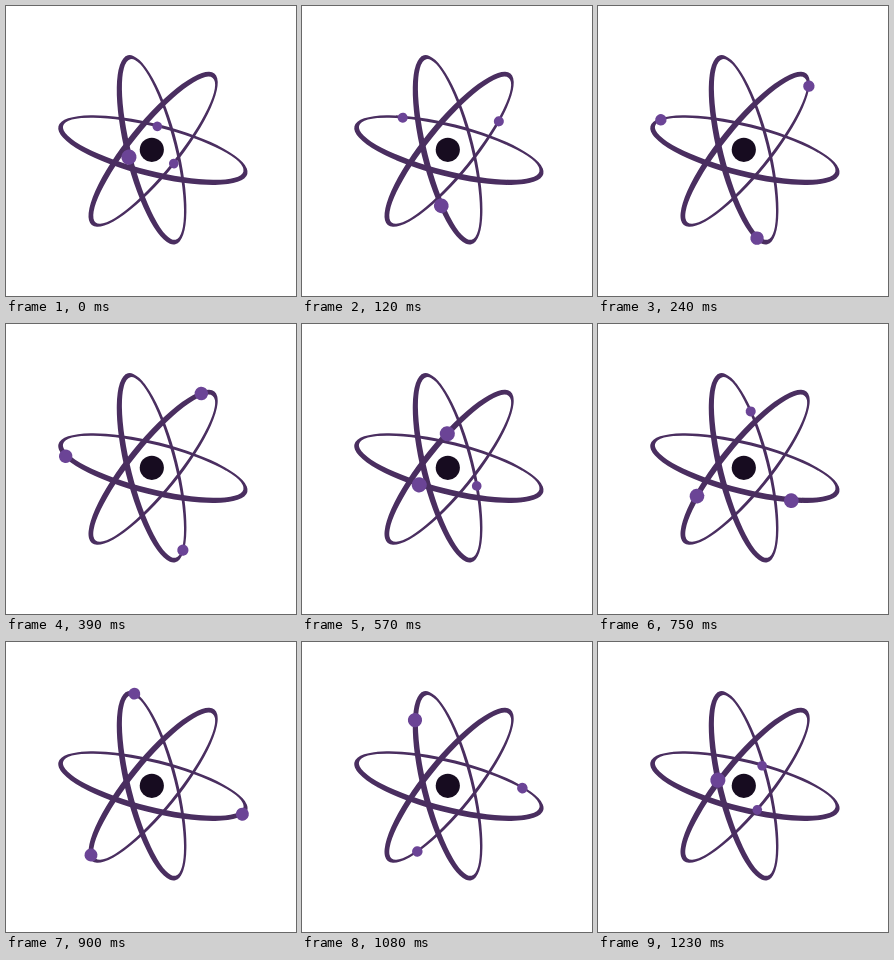
Write an HTML page that moves like this. It is 290x290 px and loops after 1.26 s.

```html
<!DOCTYPE html>
<html lang="en">
<head>
<meta charset="utf-8">
<title>Atom</title>
<style>
  html, body { margin: 0; width: 100%; height: 100%; overflow: hidden; background: #fff; }
  svg { display: block; width: 100vw; height: 100vh; }
  .ring { fill: #4a2e60; fill-rule: evenodd; }
  .electron { fill: #6b4496; }
  .nucleus { fill: #170c20; }
</style>
</head>
<body>
<svg viewBox="0 0 290 290">
  <g id="rings"></g>
  <circle class="nucleus" cx="145.8" cy="143.8" r="12.1"/>
  <g id="electrons"></g>
</svg>
<script>
  const LOOP = 1260, STEP = 30, TURN = 2 * Math.PI;

  // Local +y of each orbit points towards the viewer; phase is in turns.
  const orbits = [
    { ring: [146.9, 144.1], path: [147, 144.2], tilt: 14.15, phase: 0.003 },
    { ring: [145.6, 143.8], path: [146, 143.6], tilt: 75.9, phase: 0.503 },
    { ring: [147.1, 143.3], path: [147.9, 143.7], tilt: 129, phase: 0.003 }
  ];

  function add(parent, tag, attrs) {
    const el = document.createElementNS('http://www.w3.org/2000/svg', tag);
    for (const key in attrs) el.setAttribute(key, attrs[key]);
    return document.getElementById(parent).appendChild(el);
  }

  const ellipse = (rx, ry, dy) =>
    `M${-rx} ${dy}A${rx} ${ry} 0 1 0 ${rx} ${dy}A${rx} ${ry} 0 1 0 ${-rx} ${dy}Z`;

  const place = ([x, y], tilt) => `translate(${x} ${y}) rotate(${tilt})`;

  // The hole is shifted backwards, so the near side of the ring is thicker.
  const ringPath = ellipse(97.4, 26.3, 0) + ellipse(93, 21.9, -1.4);

  for (const o of orbits) {
    add('rings', 'path', { class: 'ring', d: ringPath, transform: place(o.ring, o.tilt) });
    o.dot = add('electrons', 'circle', { class: 'electron', transform: place(o.path, o.tilt) });
  }

  function draw(ms) {
    const t = Math.floor(ms % LOOP / STEP) * STEP / LOOP;
    for (const o of orbits) {
      const turn = (t + o.phase) * TURN;
      // Slightly quicker around the narrow ends.
      const a = turn - 0.035 * Math.sin(2 * turn);
      o.dot.setAttribute('cx', -95.8 * Math.sin(a));
      o.dot.setAttribute('cy', -24.2 * Math.cos(a));
      o.dot.setAttribute('r', 6.2 - 1.4 * Math.cos(a));
    }
  }

  const start = performance.now();
  function tick() {
    draw(performance.now() - start);
    requestAnimationFrame(tick);
  }
  tick();
</script>
</body>
</html>
```
